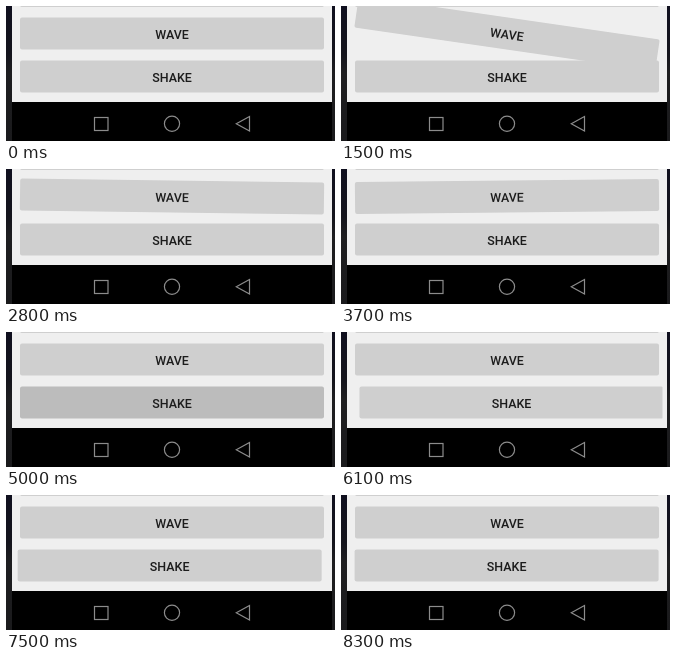
These frames come from a looping animation (329x135 px, 9200 ms). An HTML page:

```html
<!DOCTYPE html>
<html lang="en">
<head>
<meta charset="utf-8">
<title>Wave and shake</title>
<style>
  html, body { margin: 0; width: 100%; height: 100%; overflow: hidden; background: #000; }
  svg { display: block; width: 329px; height: 135px; }
  text { font: 500 12.44px Roboto, sans-serif; text-anchor: middle; fill: #1c1c1c; }
</style>
</head>
<body>
<svg viewBox="0 0 329 135">
  <defs>
    <linearGradient id="edge" x1="0" y1="0" x2="0" y2="1">
      <stop offset="0" stop-color="#10101f"/>
      <stop offset=".35" stop-color="#14141c"/>
      <stop offset=".5" stop-color="#1e1e20"/>
      <stop offset="1" stop-color="#1a1a1c"/>
    </linearGradient>
    <clipPath id="content"><rect x="10.5" y="0" width="311" height="96"/></clipPath>
  </defs>

  <rect width="329" height="135" fill="url(#edge)"/>
  <rect x="6" width="320" height="96" fill="#efefef"/>
  <rect x="6" y="96" width="320" height="39"/>

  <g clip-path="url(#content)" fill="#cfcfcf">
    <rect x="14" y="-31" width="304" height="32" rx="2"/>
    <g id="wave">
      <rect x="14" y="11.5" width="304" height="32" rx="2"/>
      <text x="166" y="32.9">WAVE</text>
    </g>
    <g id="shake">
      <rect x="14" y="54.5" width="304" height="32" rx="2"/>
      <text x="166" y="75.5">SHAKE</text>
    </g>
  </g>

  <g fill="none" stroke="#8c8c8c" stroke-width="1.2">
    <rect x="88.5" y="111.5" width="13.5" height="13"/>
    <circle cx="166" cy="117.8" r="7.6"/>
    <path d="M230.3 117.8L243.5 110.5V125Z"/>
  </g>
</svg>
<script>
const LOOP = 9200, DURATION = 3000;
const PX = 320 / 1080; // device pixels to stage pixels
const wave = document.getElementById('wave');
const shake = document.getElementById('shake');

// Evenly spaced keyframes under one overall accelerate-decelerate curve.
function animate(values, start, t) {
  const u = Math.min(1, Math.max(0, (t - start) / DURATION));
  const position = (1 - Math.cos(Math.PI * u)) / 2 * (values.length - 1);
  const i = Math.min(values.length - 2, Math.floor(position));
  return values[i] + (values[i + 1] - values[i]) * (position - i);
}

function press(button, down) {
  button.firstElementChild.setAttribute('fill', down ? '#bcbcbc' : '#cfcfcf');
}

function draw(now) {
  const t = now % LOOP;
  const angle = t < 1000 ? 0 : animate([12, -12, 3, -3, 0], 1120, t);
  const shift = PX * animate([0, 25, -25, 25, -25, 15, -15, 6, -6, 0], 5600, t);
  wave.setAttribute('transform', `rotate(${angle} 166 27.5)`);
  shake.setAttribute('transform', `translate(${shift} 0)`);
  press(wave, t >= 700 && t < 1100);
  press(shake, t >= 5000 && t < 5500);
}

const begin = performance.now();
function tick() {
  draw(performance.now() - begin);
  requestAnimationFrame(tick);
}
tick();
</script>
</body>
</html>
```
